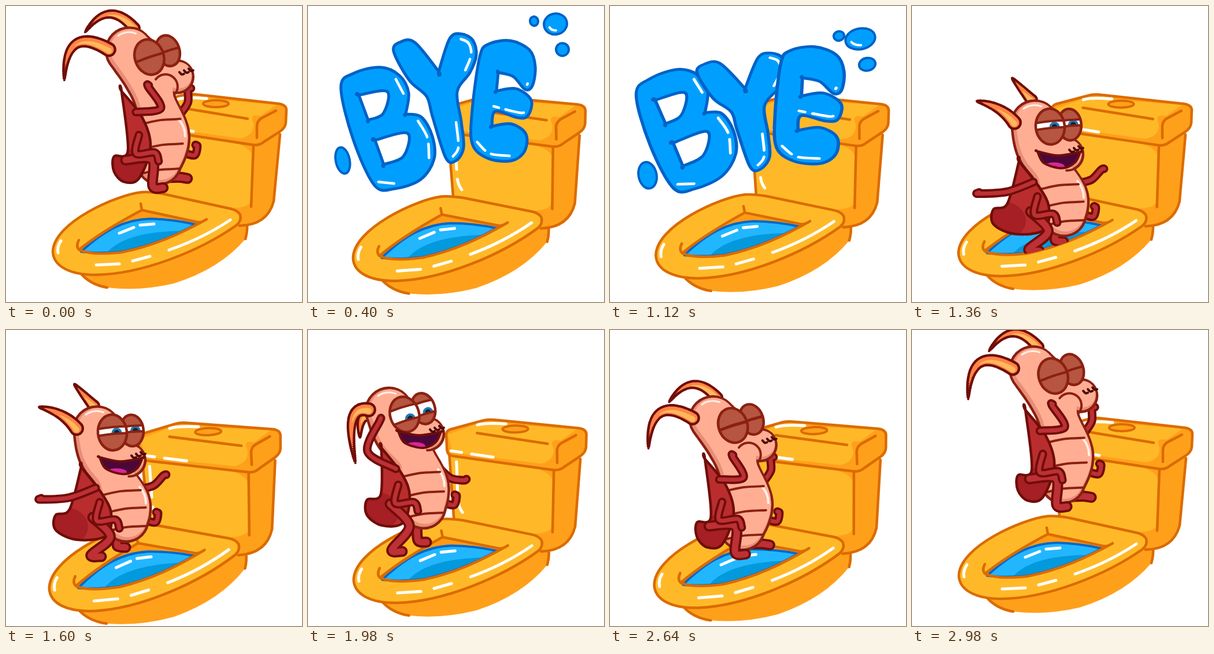
Recreate the animation shown at these times as an HTML page with a canvas. Size 512 px wide and 512 px high, loop 3000 ms.

```html
<!DOCTYPE html>
<html lang="en">
<head>
<meta charset="utf-8">
<title>Bye</title>
<style>
html, body { margin: 0; width: 100%; height: 100%; overflow: hidden; background: #fff; }
canvas { display: block; width: 512px; height: 512px; }
</style>
</head>
<body>
<canvas id="stage" width="512" height="512"></canvas>
<script>
const ctx = document.getElementById('stage').getContext('2d');
const LOOP = 3000;
const mix = (a, b, k) => a + (b - a) * k;
const blend = (a, b, k) => a.map((v, i) => mix(v, b[i], k));
const clamp = k => Math.max(0, Math.min(1, k));
const smooth = k => k * k * (3 - 2 * k);
const bump = (t, center, width) => Math.exp(-(((t - center) / width) ** 2));
const add = (p, x, y) => [p[0] + x, p[1] + y];

// ---- drawing helpers ----
function spline(pts, closed) {
  const path = new Path2D(), n = pts.length;
  const at = i => closed ? pts[(i + n) % n] : pts[Math.max(0, Math.min(n - 1, i))];
  path.moveTo(...pts[0]);
  for (let i = 0; i < (closed ? n : n - 1); i++) {
    const a = at(i - 1), b = at(i), c = at(i + 1), d = at(i + 2);
    path.bezierCurveTo(b[0] + (c[0] - a[0]) / 6, b[1] + (c[1] - a[1]) / 6,
      c[0] - (d[0] - b[0]) / 6, c[1] - (d[1] - b[1]) / 6, c[0], c[1]);
  }
  if (closed) path.closePath();
  return path;
}
function fill(path, color) {
  ctx.fillStyle = color;
  ctx.fill(path, 'evenodd');
}
function line(path, color, width) {
  ctx.strokeStyle = color;
  ctx.lineWidth = width;
  ctx.stroke(path);
}
function both(path, color, edge, width) {
  fill(path, color);
  line(path, edge, width);
}
function inside(path, draw) {
  ctx.save();
  ctx.clip(path);
  draw();
  ctx.restore();
}
function oval(x, y, rx, ry, rot = 0, from = 0, to = 7) {
  const path = new Path2D();
  path.ellipse(x, y, rx, ry, rot, from, to);
  return path;
}
// Soft solid made of overlapping discs [x, y, r].
function discs(list, color, grow, dx = 0, dy = 0) {
  const path = new Path2D();
  for (const [x, y, r] of list) {
    if (r + grow <= 0) continue;
    path.moveTo(x + dx + r + grow, y + dy);
    path.arc(x + dx, y + dy, r + grow, 0, 7);
  }
  ctx.fillStyle = color;
  ctx.fill(path);
}
function along(pts, steps) {
  const out = [], at = i => pts[Math.max(0, Math.min(pts.length - 1, i))];
  for (let i = 0; i < pts.length - 1; i++) {
    const [a, b, c, d] = [at(i - 1), at(i), at(i + 1), at(i + 2)];
    for (let j = 0; j <= steps; j++) {
      const u = j / steps;
      out.push(b.map((v, k) => v + u / 2 * (c[k] - a[k] +
        u * (2 * a[k] - 5 * v + 4 * c[k] - d[k] + u * (3 * (v - c[k]) + d[k] - a[k])))));
    }
  }
  return out;
}

// ---- toilet ----
const GOLD = '#ffb928', AMBER = '#ffa01b', RUST = '#db6b00';
const svg = s => new Path2D(s);
const FRONT = '347 369C300 395 255 415 200 426Q145 432 126 421';
const T = {
  bowl: svg('M128 461Q145 482 175 487Q230 494 290 480Q370 455 414 403L417 375L300 380Z'),
  bowlEdge: svg('M128 461Q145 482 175 487M417 376Q418 390 414 403'),
  tank: svg('M249 212L255 330L400 380Q452 379 463 338L474 218L434 241Z'),
  tankLight: svg('M251 212L257 321Q300 344 372 349Q418 352 423 338L427 262Q425 244 390 235Z'),
  tankEdge: svg('M249 213L255 324M428 242L424 347M404 380Q452 379 463 338L474 222'),
  lid: svg('M244 176Q245 170 252 168L306 154Q316 151 330 153L472 169Q485 171 485 180L484 202Q483 211 474 217L446 235Q438 242 426 240L255 214Q246 213 245 204Z'),
  lidLight: svg('M247 177L306 157L468 171L440 190Q420 185 428 203Q430 224 405 229L255 208Z'),
  lidEdge: svg('M297 175L418 195M467 181L442 194Q434 199 434 208V228'),
  seat: svg('M235 322C193 326 82 374 81 425C82 450 110 465 155 465C235 464 335 424 399 379Q408 371 405 361Q401 354 390 351L272 325Q250 321 235 322Z'),
  wall: svg('M126 421Q165 390 235 353L332 374L' + FRONT),
  water: svg('M130 425C170 388 205 369 250 368Q290 369 328 378Q265 412 200 425Q160 429 130 425Z'),
  deep: svg('M173 428Q205 390 305 389Q260 414 200 426Z'),
  rim: svg('M126 405Q120 416 127 422M235 353L332 374Q340 374 347 369M127 421Q165 390 235 353L233 342M' + FRONT),
  shine: svg('M298 161Q312 157 347 160M252 205L270 208M287 211L324 217M261 224L262 276M263 293Q264 303 270 311M196 393L221 383M232 379L256 377M90 427Q88 416 95 406M156 448L196 446M219 441L249 433M282 422Q340 402 388 370'),
  above: svg('M126 421H-50V-300H600V369H' + FRONT)
};
const tilt = s => new DOMMatrix([1 + 0.02 * s, -0.04 * s, 0.05 * s, 1 + 0.02 * s, -29 * s, 18 * s]);
function toilet(s) {
  ctx.setTransform(tilt(s));
  fill(T.bowl, AMBER);
  line(T.bowlEdge, RUST, 4.5);
  fill(T.tank, AMBER);
  fill(T.tankLight, GOLD);
  line(T.tankEdge, RUST, 4.5);
  fill(T.lid, AMBER);
  fill(T.lidLight, GOLD);
  line(T.lid, RUST, 4.5);
  line(T.lidEdge, RUST, 4.5);
  both(oval(363, 169, 22, 6), AMBER, RUST, 4);
  both(T.seat, GOLD, RUST, 4.5);
  fill(T.wall, '#ff9a14');
  fill(T.water, '#22b6ff');
  inside(T.water, () => fill(T.deep, '#0399dd'));
  line(T.water, '#0068cc', 4);
  line(T.rim, RUST, 4.5);
  line(T.shine, '#fff', 5);
  ctx.resetTransform();
}

// Eased value between [time, value] keys.
function keyed(keys, t) {
  let i = 0;
  while (i < keys.length - 2 && t >= keys[i + 1][0]) i++;
  const [[t0, a], [t1, b]] = [keys[i], keys[i + 1]];
  return [a, b, smooth(clamp((t - t0) / (t1 - t0)))];
}
const sway = [[90, 0], [180, 1.1], [400, .5], [1120, .28], [1300, 0], [1600, 1], [1760, .1],
  [1980, .33], [2200, 0], [2460, 0], [2580, 1], [2760, 0]];

// ---- letters ----
const points = s => s.split(' ').map(p => p.split(',').map(Number));
// warp: how far the letter slants, grows and shifts once it relaxes; shine: runs along the outline
const letters = [
  { out: '57,140 80,116 125,106 158,120 174,150 169,187 169,187 196,192 215,225 218,265 195,300 150,316 115,310 78,230',
    holes: ['88,154 88,154 137,148 130,186 104,197 104,197', '116,232 116,232 172,220 165,260 131,274 131,274'],
    mid: [137, 210], warp: [.055, -.14, .02, 0, -6, 2], shine: [[3, 4], [7, 9], [11, 12]] },
  { out: '148,78 160,62 185,63 226,113 226,113 245,56 265,48 285,59 291,85 280,115 258,148 265,200 269,245 255,268 238,262 215,190 205,156 175,128',
    holes: [], mid: [222, 160], warp: [.08, -.06, -.03, -.09, 6, 26], shine: [[6, 9], [11, 13]] },
  { out: '297,88 312,66 350,60 383,76 393,105 388,138 375,144 355,122 329,115 329,115 326,147 326,147 360,143 386,163 380,190 362,193 324,182 318,208 318,208 352,204 377,222 374,252 350,268 310,263 284,238 284,180',
    holes: [], mid: [335, 160], warp: [.13, -.03, .05, -.03, 7, 8], shine: [[5, 6], [14, 16], [22, 24]] }
].map(l => {
  const out = points(l.out), path = spline(out, true);
  l.holes.forEach(h => path.addPath(spline(points(h), true)));
  const inset = i => {
    const a = out[i - 1], b = out[i + 1], n = 9 / Math.hypot(b[0] - a[0], b[1] - a[1]);
    return add(out[i], (a[1] - b[1]) * n, (b[0] - a[0]) * n);
  };
  const shine = l.shine.map(([from, to]) =>
    spline(Array.from({ length: to - from + 1 }, (_, i) => inset(from + i))));
  return { path, shine, mid: l.mid, warp: l.warp };
});
const drops = [[391, 26, 7, 8], [428, 31, 20, 18], [440, 75, 11, 11], [60, 267, 12, 23]];
const BLUE = '#009fff', NAVY = '#0062c8';

function bye(t) {
  if (t < 170 || t > 1340) return;
  const u = clamp((t - 170) / 220) - 1;
  const size = 1 + 2.4 * u ** 3 + 1.4 * u * u - clamp((t - 1160) / 180) ** 2;
  const d = Math.max(0, t - 400), fade = Math.exp(-d / 150);
  const relax = 1 - fade * Math.cos(d / 57) + 0.08 * (1 - fade) * Math.sin((t - 1120) / 57);
  ctx.save();
  ctx.translate(230, 395);
  ctx.scale(size, size);
  ctx.translate(-230, -395);
  for (const { path, shine, mid, warp } of letters) {
    const [a, b, c, e, x, y] = warp.map(v => v * relax);
    ctx.save();
    ctx.translate(mid[0], mid[1]);
    ctx.transform(1 + a, b, c, 1 + e, x, y);
    ctx.translate(-mid[0], -mid[1]);
    both(path, BLUE, NAVY, 5);
    ctx.setLineDash([32, 12]);
    shine.forEach(s => line(s, '#fff', 4.5));
    ctx.restore();
  }
  drops.forEach(([x, y, rx, ry]) => {
    const [cx, cy] = [x + 5 * relax, y + 26 * relax], wide = rx * (1 + 0.3 * relax);
    both(oval(cx, cy, wide, ry, -0.2), BLUE, NAVY, 4);
    if (rx > 15) line(oval(cx, cy, wide - 8, ry - 7, 0, 1.5, 2.6), '#fff', 4);
  });
  ctx.restore();
}

// ---- cockroach ----
// spine: head, face, neck, belly, tail; eye: x, y, tilt, upper and lower lid; arm: hand and bend
const RADII = [40, 43, 35, 43, 38];
const LEAP = { spine: [213, 77, 245, 118, 258, 165, 274, 225, 265, 270], muzzle: [296, 122], eye: [248, 88, -.33, 0, 0],
  horn: [102, 30, 101, 128], ear: [222, 38, 177, -14, 137, 45], rump: [183, 272], arm: [246, 139, 36],
  armBack: [315, 144], foot: [254, 311], open: [0], reach: [1] };
const LAND = { spine: [157, 172, 168, 212, 188, 255, 206, 300, 208, 328], muzzle: [213, 225], eye: [184, 177, -.1, -.3, .08],
  horn: [100, 141, 57, 133], ear: [152, 131, 140, 118, 118, 93], rump: [82, 332], arm: [60, 293, -7],
  armBack: [272, 252], foot: [147, 389], open: [1], reach: [1] };
const WAVE = { spine: [140, 140, 158, 178, 185, 222, 200, 270, 200, 305], muzzle: [207, 180], eye: [167, 146, -.3, -.42, .35],
  horn: [60, 128, 82, 230], ear: [102, 148, 88, 150, 90, 186], rump: [98, 306], arm: [124, 157, -37],
  armBack: [269, 260], foot: [145, 380], open: [1], reach: [1] };
const STAND = { spine: [168, 117, 185, 160, 198, 215, 203, 262, 203, 296], muzzle: [222, 182], eye: [199, 132, -.04, -.6, .45],
  horn: [98, 94, 78, 183], ear: [132, 113, 112, 118, 106, 138], rump: [102, 284], arm: [232, 282, 0],
  armBack: [215, 240], foot: [142, 376], open: [1], reach: [0] };
const acts = [[0, LEAP], [150, LEAP], [151, LAND], [1660, LAND], [1760, WAVE], [2130, WAVE],
  [2250, STAND], [2570, STAND], [2650, LEAP], [LOOP, LEAP]];
const INK = '#700d08', BROWN = '#8b2012', PINK = '#ffae93', RED = '#bd3036';

function limb(root, hand, bend, tip, width) {
  const dx = hand[0] - root[0], dy = hand[1] - root[1], n = bend / Math.hypot(dx, dy);
  const elbow = [root[0] + dx / 2 - dy * n, root[1] + dy / 2 + dx * n];
  const path = spline([root, elbow, hand, add(hand, ...tip)]);
  line(path, INK, width);
  line(path, RED, width - 8);
}
function horn([x0, y0], [x1, y1, x2, y2], width) {
  const list = Array.from({ length: 50 }, (_, i) => {
    const t = i / 49, u = 1 - t;
    return [u * u * x0 + 2 * u * t * x1 + t * t * x2, u * u * y0 + 2 * u * t * y1 + t * t * y2, width * u ** 0.6];
  });
  discs(list, INK, 2);
  discs(list, '#ff8446', -2.3);
  discs(list.slice(0, 26).map(([x, y], i) => [x, y, 5 - i / 6]), '#ffb95c', 0, 0, 2);
}
function eye(x, y, tilt, top, low, size) {
  const rx = 25 * size, ry = 31 * (0.4 + 0.6 * size), rim = oval(0, 0, rx, ry);
  const a = top * ry, b = low * ry;
  ctx.save();
  ctx.translate(x, y);
  ctx.rotate(tilt);
  fill(rim, '#b65540');
  inside(rim, () => {
    const gap = new Path2D();
    gap.rect(-rx, a, 2 * rx, Math.max(0, b - a));
    fill(gap, '#fff');
    inside(gap, () => {
      fill(oval(rx * 0.3, b - 1, 9, 9), '#1f79b5');
      fill(oval(rx * 0.3, b - 1, 5, 5), '#10222e');
    });
    for (const y of [a, b]) line(spline([[-rx, y + 1], [0, y], [rx, y + 1]]), BROWN, 4);
  });
  line(rim, BROWN, 4.5);
  ctx.restore();
}
function trunk(list, spine, [mx, my]) {
  discs(list, BROWN, 2.2);
  discs(list, '#e88e78', -2.2);
  discs(list, PINK, -5, 2.5, -2.5);
  const [head, , neck, belly, tail] = spine;
  line(oval(head[0], head[1], 32, 32, 0, -2.2, -1.2), '#fff0e8', 3);
  line(oval(belly[0], belly[1], 36, 40, 0, -0.8, 0), '#fff0e8', 4);
  for (const [x, y] of [blend(neck, belly, 0.55), blend(belly, tail, 0.35), add(tail, 0, 14)])
    line(spline([[x - 28, y + 5], [x, y - 1], [x + 35, y - 3]]), BROWN, 4);
  line(oval(mx, my, 28, 28, 0, 0.2, 1.6), BROWN, 4);
}
function face(p) {
  const [mx, my] = p.muzzle, open = p.open[0], [ex, ey, turn, top, low] = p.eye;
  eye(ex + 34 * Math.cos(turn), ey + 34 * Math.sin(turn), turn, top, low, 0.8);
  eye(ex, ey, turn, top, low, 1);
  if (open > 0.2) {
    const mouth = spline([[-51, -5], [-51, -5], [-15, 2], [23, -4], [23, -4], [14, 14], [-8, 24], [-40, 15]]
      .map(([x, y]) => [mx + x * open, my + y * open]), true);
    fill(mouth, '#4b0738');
    inside(mouth, () => fill(oval(mx - 22, my + 21, 18, 7), '#d7279b'));
    line(mouth, INK, 4);
  } else line(oval(mx - 20, my + 17, 21, 21, 0, -2.5, 0.6), BROWN, 4);
  for (let i = 0; i < 3; i++) {
    const x = mx + 8 + 8 * i, y = my - 5 - 3 * i;
    line(spline([[x - 4, y - 3], [x, y + 1], [x + 4, y]]), '#4d0806', 4);
  }
}
function shellOf(neck, belly, tail, rump) {
  const top = add(neck, -58, -18), low = add(tail, -35, 28);
  return spline([top, top, add(neck, -22, 28), add(belly, -24, 18), low,
    add(blend(rump, low, 0.45), 0, 20), add(rump, 4, 14), add(rump, 4, -12), add(rump, 28, -22)], true);
}

// Path of the whole body: dive, pop out of the water, hop, leap.
function place(t) {
  if (t <= 150) return [-0.13 * t, 0.35 * t + 0.012 * t * t];
  if (t < 1600) {
    const u = clamp((t - 1300) / 285);
    return [70 * (1 - u), (1 - u) * (190 - 700 * u)];
  }
  if (t < 2570) return [0, -32 * Math.sin(Math.PI * clamp((t - 1660) / 200))];
  const rise = (1 - clamp((t - 2620) / 240)) ** 2 * clamp((t - 2570) / 60);
  const end = clamp((LOOP - t) / 20);
  return [-40 * rise - 4 * end * clamp((t - 2620) / 240), 85 * rise - 9 * end * clamp((t - 2620) / 240)];
}
function roach(t, s) {
  if (t > 150 && t < 1300) return;
  const [from, to, k] = keyed(acts, t), p = {};
  for (const name in from) p[name] = blend(from[name], to[name], k);
  const waving = (from === WAVE ? 1 - k : 0) + (to === WAVE ? k : 0);
  p.arm[0] += 9 * waving * Math.sin((t - 1980) / 38);
  const spine = RADII.map((r, i) => [p.spine[2 * i], p.spine[2 * i + 1], r]);
  const [head, , neck, belly, tail] = spine, reach = p.reach[0];

  ctx.save();
  if (t < 1420) {
    const gate = new Path2D();
    gate.addPath(T.above, tilt(s));
    ctx.clip(gate);
  }
  const [x, y] = place(t);
  ctx.translate(x, y + 388);
  ctx.scale(1, 1 - 0.14 * bump(t, 2570, 50) - 0.06 * bump(t, 1650, 25));
  ctx.translate(0, -388);

  horn(p.ear, p.ear.slice(2), 9);
  limb(add(neck, 45, 20), p.armBack, 6, [5, -2], 15);
  limb(add(belly, 38 * reach, 30), add(belly, 57 * reach, 18), 10, [-3, -3], 15);
  limb(add(tail, -12, 25), add(p.foot, 46, -15), 1, [14, 2], 19);
  trunk(along(spine, 16).concat([[...p.muzzle, 28]]), spine, p.muzzle);
  horn(add(head, -35, -2), p.horn, 11);

  const shell = shellOf(neck, belly, tail, p.rump);
  fill(shell, '#b92d2f');
  inside(shell, () => fill(oval(p.rump[0] + 18, p.rump[1] + 8, 42, 34), '#a51f24'));
  line(shell, INK, 4.5);
  limb(add(tail, -58, -4), p.foot, -32, [18, 3], 19);
  limb(add(belly, -44, -2), add(belly, -17, 28), 25, [7, 15], 15);
  face(p);
  limb(add(neck, -33, 18), p.arm, p.arm[2], [1, -2], 15);
  ctx.restore();
}

// ---- loop ----
function frame(t) {
  ctx.fillStyle = '#fff';
  ctx.fillRect(0, 0, 512, 512);
  ctx.lineCap = ctx.lineJoin = 'round';
  const s = mix(...keyed(sway, t));
  toilet(s);
  roach(t, s);
  bye(t);
}
const start = performance.now();
function tick() {
  frame((performance.now() - start) % LOOP);
  requestAnimationFrame(tick);
}
tick();
</script>
</body>
</html>
```
